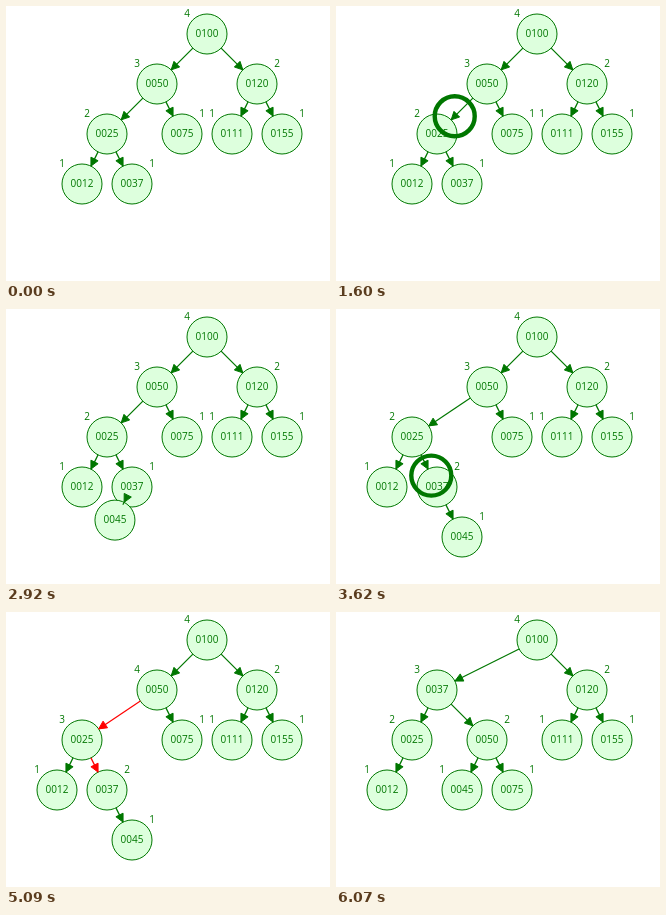
An HTML page with a canvas for the animation above (6.91 s loop, 324x275 px).

```html
<!DOCTYPE html>
<html lang="en">
<head>
<meta charset="utf-8">
<title>Balanced tree insertion</title>
<style>
  html, body { margin: 0; width: 100%; height: 100%; overflow: hidden; background: #fff; }
  canvas { display: block; width: 324px; height: 275px; }
</style>
</head>
<body>
<canvas id="stage"></canvas>
<script>
const W = 324, H = 275, LOOP = 6910;
const R = 20, HALF = 25, ROW = 50;
const STEP = 298, PAUSE = 30;
const GREEN = '#007700', PALE = '#ddffdd', RED = '#ff0000';

const canvas = document.getElementById('stage');
const ctx = canvas.getContext('2d');
const dpr = window.devicePixelRatio || 1;
canvas.width = W * dpr;
canvas.height = H * dpr;

const mix = (a, b, p) => a + (b - a) * p;

// ---- Tree layout: every subtree is as wide as its leaves need ----

function insert(node, key) {
  if (!node) return { key };
  const branch = key < node.key ? 'left' : 'right';
  node[branch] = insert(node[branch], key);
  return node;
}

function measure(node) {
  if (!node) return { width: HALF, h: 0 };
  const l = measure(node.left), r = measure(node.right);
  node.lw = l.width;
  node.rw = r.width;
  node.h = 1 + Math.max(l.h, r.h);
  return { width: l.width + r.width, h: node.h };
}

function place(node, x, y, side, parent, out) {
  const { key, h, left, right, lw, rw } = node;
  out[key] = { x, y, side, h, parent };
  if (left) place(left, x - left.rw, y + ROW, -1, key, out);
  if (right) place(right, x + right.lw, y + ROW, 1, key, out);
  return out;
}

function layout(keys) {
  const root = keys.reduce(insert, null);
  measure(root);
  return place(root, 201, 28, -1, null, {});
}

const keys = [100, 50, 120, 25, 75, 111, 155, 12, 37];
const before = layout(keys);
const grown = layout([...keys, 45]);
const rotated = layout([100, 37, 120, 25, 50, 75, 111, 155, 12, 45]);
const entering = { ...before, 45: { ...grown[45], x: -74, y: 30 } };
const attached = { ...before, 45: { ...grown[45], x: before[37].x, y: before[37].y + ROW } };

// ---- Script: stages follow one another ----

let clock = 512;
const stages = [];

function add(kind, data = {}, ms = STEP) {
  const stage = { kind, from: clock, to: clock += ms, ...data };
  stages.push(stage);
  return stage;
}
const wait = () => { clock += PAUSE; };
const ring = (a, b, map) => add('ring', { a: map[a], b: map[b] });
const mark = (key, ms) => add('mark', { key }, ms);

[100, 50, 25, 37].forEach((key, i, path) => {
  if (i) ring(path[i - 1], key, before);
  add('flash', { key });
});
wait();
const drop = add('drop');
const spread = add('spread');
wait();
mark(37);
ring(37, 25, grown);
mark(25, STEP + 10);
ring(25, 50, grown);
mark(50, STEP * 2 + 20);
const warn = add('warn');
wait();
const rotate = add('rotate');
ring(37, 100, rotated);

const active = (kind, t) => stages.find(s => s.kind === kind && t >= s.from && t < s.to);
const progress = (s, t) => Math.min(1, (t - s.from) / (s.to - s.from));

function blend(from, to, p) {
  const out = {};
  for (const k in to) {
    out[k] = { ...to[k] };
    for (const f of ['x', 'y', 'side']) out[k][f] = mix(from[k][f], to[k][f], p);
  }
  return out;
}

function nodesAt(t) {
  if (t < drop.from) return before;
  if (t < spread.from) return blend(entering, attached, progress(drop, t));
  if (t < rotate.from) return blend(attached, grown, progress(spread, t));
  return blend(grown, rotated, progress(rotate, t));
}

// A height is updated once its node has been marked
function heightAt(key, t) {
  if (t >= rotate.from) return rotated[key].h;
  const marked = stages.some(s => s.kind === 'mark' && s.key == key && t >= s.from);
  return (marked ? grown : attached)[key].h;
}

// Pictures advance about 13 times a second, after each anchor
function snap(t) {
  const anchor = [5456, 3620, 526].find(a => t >= a);
  return anchor ? anchor + Math.floor((t - anchor) / 76.6) * 76.6 : 0;
}

// Triangle wave between 3 and 7 px
const glowAt = t => 7 - Math.abs(((t - 600) / 205 + 8) % 8 - 4);

// ---- Drawing ----

function circle(x, y, r) {
  ctx.beginPath();
  ctx.arc(x, y, r, 0, Math.PI * 2);
}

function text(str, x, y, color) {
  ctx.fillStyle = color;
  ctx.fillText(str, x, y + 3);
}

function drawNode(key, { x, y }, glow) {
  if (glow) {
    circle(x, y, R + glow);
    ctx.fillStyle = RED;
    ctx.fill();
  }
  circle(x, y, R);
  ctx.fillStyle = PALE;
  ctx.fill();
  ctx.lineWidth = 1;
  ctx.strokeStyle = GREEN;
  ctx.stroke();
  text(key.padStart(4, '0'), x, y, GREEN);
}

function drawEdge(a, b, color) {
  const d = Math.hypot(b.x - a.x, b.y - a.y);
  const ux = (b.x - a.x) / d, uy = (b.y - a.y) / d;
  const x = b.x - ux * R, y = b.y - uy * R;
  ctx.strokeStyle = ctx.fillStyle = color;
  ctx.lineWidth = 1.2;
  ctx.beginPath();
  ctx.moveTo(a.x + ux * R, a.y + uy * R);
  ctx.lineTo(x, y);
  ctx.stroke();
  ctx.lineWidth = 1;
  ctx.beginPath();
  ctx.moveTo(x, y);
  ctx.lineTo(x - ux * 8 - uy * 4, y - uy * 8 + ux * 4);
  ctx.lineTo(x - ux * 8 + uy * 4, y - uy * 8 - ux * 4);
  ctx.closePath();
  ctx.fill();
  ctx.stroke();
}

function drawRing(s, t) {
  const p = progress(s, t);
  circle(mix(s.a.x, s.b.x, p), mix(s.a.y, s.b.y, p), R);
  ctx.lineWidth = 4.4;
  ctx.strokeStyle = GREEN;
  ctx.stroke();
}

function draw(t) {
  ctx.setTransform(dpr, 0, 0, dpr, 0, 0);
  ctx.fillStyle = '#fff';
  ctx.fillRect(0, 0, W, H);
  ctx.font = '10px "Open Sans", "Noto Sans", sans-serif';
  ctx.textAlign = 'center';

  const nodes = nodesAt(t);
  const flash = active('flash', t), marked = active('mark', t), moving = active('ring', t);
  const warned = t >= warn.from && t < rotate.from;

  for (const k in nodes) {
    const n = nodes[k];
    drawNode(k, n, flash && flash.key == k ? glowAt(t) : 0);
    if (k == 45 && t < spread.from) continue;
    text(heightAt(k, t), n.x + n.side * R, n.y - R, marked && marked.key == k ? RED : GREEN);
  }
  for (const k in nodes) {
    const n = nodes[k];
    const red = warned && (k == 25 || k == 37);
    if (n.parent) drawEdge(nodes[n.parent], n, red ? RED : GREEN);
  }
  if (moving) drawRing(moving, t);
}

const begin = performance.now();
function tick() {
  draw(snap((performance.now() - begin) % LOOP));
  requestAnimationFrame(tick);
}
tick();
</script>
</body>
</html>
```
